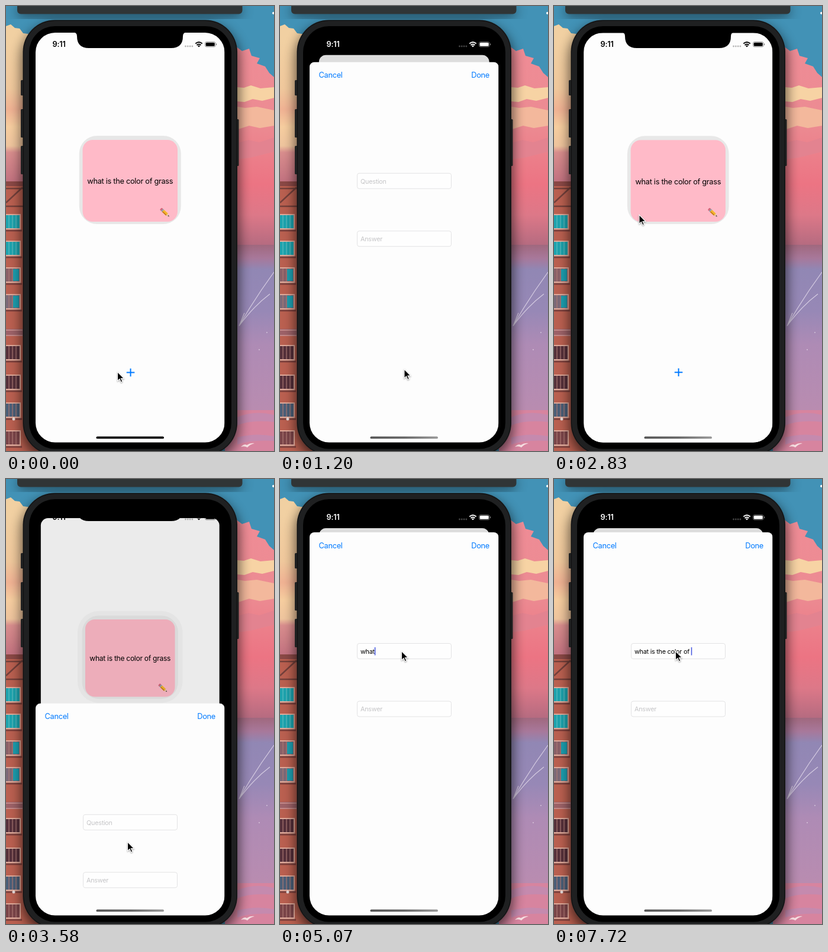
These frames come from a looping animation (453x751 px, 8000 ms). An HTML page:

```html
<!DOCTYPE html>
<html lang="en">
<head>
<meta charset="utf-8">
<title>Flash cards</title>
<style>
html, body { margin: 0; width: 100%; height: 100%; overflow: hidden; background: #000; }
svg { display: block; width: 453px; height: 751px; }
text { font-family: Inter, Roboto, sans-serif; white-space: pre; }
.big { font-size: 12.8px; letter-spacing: -.3px; }
.small { font-size: 10.8px; letter-spacing: -.24px; }
.hint { fill: #c5c5c7; }
.blue { fill: #007aff; }
</style>
</head>
<body>
<svg viewBox="0 0 453 751" xmlns="http://www.w3.org/2000/svg">
  <defs>
    <linearGradient id="left" x2="0" y2="1">
      <stop offset=".04" stop-color="#f1d0a2"/><stop offset=".15" stop-color="#f0c89c"/>
      <stop offset=".2" stop-color="#f0b293"/><stop offset=".24" stop-color="#f6cd9f"/>
      <stop offset=".285" stop-color="#eec49d"/><stop offset=".3" stop-color="#d88d8d"/>
      <stop offset=".4" stop-color="#b8667a"/>
    </linearGradient>
    <linearGradient id="cloud" x2="0" y2="1">
      <stop offset="0" stop-color="#ef8c96"/><stop offset=".4" stop-color="#ec8b92"/>
      <stop offset=".7" stop-color="#ec7483"/><stop offset=".85" stop-color="#dd7888"/>
      <stop offset="1" stop-color="#b56b80"/>
    </linearGradient>
    <linearGradient id="water" x2="0" y2="1">
      <stop offset="0" stop-color="#a0687e"/><stop offset=".08" stop-color="#a8789a"/>
      <stop offset=".15" stop-color="#9187b4"/><stop offset=".4" stop-color="#9788b6"/>
      <stop offset=".6" stop-color="#ae8bb5"/><stop offset="1" stop-color="#b98cb0"/>
    </linearGradient>
    <linearGradient id="bar">
      <stop offset="0" stop-color="#555"/><stop offset=".5" stop-color="#666"/><stop offset="1" stop-color="#999"/>
    </linearGradient>
    <filter id="soft" x="-20%" y="-20%" width="140%" height="140%"><feGaussianBlur stdDeviation="10"/></filter>
    <clipPath id="screen"><rect x="50" y="45" width="319.5" height="691.5" rx="33"/></clipPath>
  </defs>

  <!-- wallpaper -->
  <rect width="453" height="751" fill="#4292b6"/>
  <path d="M0 34l8-3 7 6 8 1 6 8 31 4V751H0z" fill="url(#left)"/>
  <path d="M370 60L391 70 399 76 411 72 415 84 429 88 424 97 438 102 445 113 453 120V404H370z" fill="url(#cloud)"/>
  <path d="M380 136l22 2 12-4 16 5 23-2v18l-20 5-16-3-14 5-23-2z" fill="#f7d3a4"/>
  <path d="M380 168l24 4 20-2 29 6v26l-24 4-18-4-31 10z" fill="#f3b89c"/>
  <path d="M380 234l30-8 18 4 25-8v24l-40 10-33 4z" fill="#e38390"/>
  <rect x="370" y="403" width="83" height="280" fill="url(#water)"/>
  <rect x="370" y="682" width="83" height="69" fill="#d7849f"/>
  <path d="M391 694q28-12 62-4v12q-40-4-62 6zM391 728q30-8 62-2v8q-40-2-62 6z" fill="#c58aae"/>
  <path d="M394 540Q420 494 453 449M394 540Q418 507 446 486M394 540l9-22" fill="none" stroke="#d6cce2" stroke-width="1.2"/>
  <path d="M397 744q6-6 10-3 6-4 13-3-8 2-12 7-4-3-11-1z" fill="#f6dfe2"/>
  <g fill="#fff"><circle cx="452" cy="12" r="2"/><circle cx="428" cy="580" r=".7"/><circle cx="441" cy="551" r=".7"/></g>

  <!-- building -->
  <rect y="296" width="60" height="455" fill="#ba6050"/>
  <path d="M0 296h30v8H0z" fill="#8a4845"/>
  <path d="M0 308h30M0 332L28 306M0 338h30" fill="none" stroke="#74403b" stroke-width="2.5"/>
  <path d="M0 545h30v12H0z" fill="#9d6268"/>
  <path d="M0 547h28M0 556h28" stroke="#cf9694" stroke-width="1.4"/>
  <g id="windows"></g>
  <circle cx="13" cy="697" r="2.5" fill="#fff" opacity=".8"/>

  <!-- toolbar and phone -->
  <rect x="19" y="0" width="380" height="18" rx="8" opacity=".5" filter="url(#soft)"/>
  <rect x="26" y="30" width="368" height="740" rx="58" opacity=".6" filter="url(#soft)"/>
  <rect x="19" y="-12" width="380.500" height="25.500" rx="6" fill="#303536"/>
  <g fill="#1f2021">
    <rect x="25" y="125" width="6" height="26" rx="1.500"/><rect x="25" y="174" width="6" height="48" rx="1.500"/>
    <rect x="25" y="236" width="6" height="48" rx="1.500"/><rect x="388" y="191" width="5.500" height="79" rx="1.500"/>
    <rect x="28.500" y="23.500" width="362.500" height="734.500" rx="54"/>
  </g>
  <rect x="29.500" y="24.500" width="360.500" height="732.500" rx="53" fill="none" stroke="#0e0e0f"/>
  <rect x="39" y="34" width="342" height="713.500" rx="44"/>

  <g clip-path="url(#screen)">
    <g id="home">
      <rect x="-159.750" width="319.500" height="700" rx="13" fill="#fdfdfd"/>
      <rect id="halo" x="-94" y="166" width="188" height="164" rx="38"/>
      <rect id="shade" x="-86" y="174" width="172" height="149" rx="30"/>
      <rect x="-80.250" y="181" width="160.500" height="138" rx="17" fill="#ffbac8"/>
      <text class="big" y="255.400" text-anchor="middle">what is the color of grass</text>
      <g transform="translate(51.700 297) rotate(43)">
        <rect y="-2.500" width="4" height="5" rx="1.500" fill="#d5687d"/>
        <rect x="3" y="-2.500" width="2.500" height="5" fill="#8fa3ad"/>
        <rect x="5.500" y="-2.500" width="9" height="5" fill="#f4b62b"/>
        <rect x="5.500" y=".8" width="9" height="1.700" fill="#c47a1c"/>
        <path d="M14.500-2.500L19.500 0 14.500 2.500z" fill="#e9c49a"/>
        <path d="M17.300-1.100L19.800 0 17.300 1.100z" fill="#333"/>
      </g>
      <path d="M-6 573.500H7.600M.8 566.700v13.600" stroke="#007aff" stroke-width="2"/>
      <rect id="dim" x="-159.750" width="319.500" height="700" rx="13"/>
    </g>
    <g id="sheet">
      <rect x="50" width="319.500" height="700" rx="8" fill="#fdfdfd"/>
      <text id="cancel" class="big blue" x="65.500" y="26.500">Cancel</text>
      <text class="big blue" x="354" y="26.500" text-anchor="end">Done</text>
      <g fill="#fefefe" stroke="#e3e3e4">
        <rect x="130.500" y="187.500" width="159" height="26" rx="3.500"/>
        <rect x="130.500" y="285" width="159" height="26" rx="3.500"/>
      </g>
      <text id="question" class="small" x="136" y="204.800"></text>
      <text class="small hint" x="136" y="302">Answer</text>
      <rect id="caret" y="194" width="1.500" height="13.500" fill="#4356e0"/>
    </g>
  </g>
  <path d="M112 44q8 0 8 7 0 20 20 20h139q20 0 20-20 0-7 8-7z"/>
  <g id="status">
    <text x="78.500" y="69.300" font-size="12.700" font-weight="600" letter-spacing="-.2">9:11</text>
    <g opacity=".27"><circle cx="303.500" cy="68" r="1.400"/><circle cx="307.300" cy="68" r="1.400"/><circle cx="311.100" cy="68" r="1.400"/><circle cx="314.900" cy="68" r="1.400"/></g>
    <path d="M320.300 63.500q5.700-5 11.400 0M322.500 66q3.500-3 7 0" fill="none" stroke="currentColor" stroke-width="1.900"/>
    <path d="M323.800 67.200q2.200-1.600 4.400 0L326 69.600z"/>
    <rect x="336.500" y="60.500" width="17.500" height="8.500" rx="2.500" fill="none" stroke="currentColor" stroke-opacity=".4"/>
    <rect x="337.700" y="61.700" width="15" height="6.100" rx="1.500"/>
    <rect x="355" y="63.200" width="1.200" height="3" rx=".6" opacity=".5"/>
  </g>
  <rect id="indicator" x="152.500" y="726.500" width="114.500" height="3.800" rx="1.900"/>
  <path id="mouse" d="M0 0V15.200L3.500 12 6 17.400 8.400 16.300 6 11.100H10.900z" stroke="#fff" stroke-width="1.100" style="filter:drop-shadow(0 1px 1px #0006)"/>
</svg>
<script>
const $ = id => document.getElementById(id);
const LOOP = 8000;

// building windows: top edge and glass colour
const panes = [[351, '#1da3ae'], [396, '#1da3ae'], [441, '#8a6068'], [486, '#7c6a78'],
               [572, '#55303a'], [622, '#55303a'], [669, '#4b5f78'], [716, '#7a4448']];
$('windows').innerHTML = panes.map(([y, c], i) => `
  <rect y="${y}" width="25" height="27" fill="#e0aa9b"/>
  <rect y="${y + 2}" width="23" height="22" fill="${c}"/>
  <path d="M5 ${y + 2}v22M11 ${y + 2}v22M17 ${y + 2}v22" stroke="${i < 2 ? '#62bcc0' : '#ad7a75'}" stroke-width="1.2"/>
  ${i > 1 && i < 4 ? `<path d="M12 ${y + 3}h10v20h-10z" fill="#1c9fb0"/>` : ''}
  <path d="M0 ${y + 28}h27" stroke="#7d403c" stroke-width="3"/>`).join('');

// screen refreshes: start, end, count
const ticks = [0];
for (const [a, b, n] of [[150, 450, 3], [900, 1800, 7], [1950, 2980, 8], [3130, 4170, 8],
                         [4470, 5070, 3], [5370, 6250, 7], [6700, 7720, 8]])
  for (let i = 0; i < n; i++) ticks.push(Math.round((a + (b - a) * i / (n - 1)) / 10) * 10);

const path = [[0, 188.5, 617.5], [450, 210, 613], [1200, 210, 613], [2100, 86.5, 109.5], [2400, 86.5, 109.5],
              [3280, 205.5, 612.5], [3580, 205.5, 612.5], [4020, 206.5, 286], [4170, 205.5, 290.5], [LOOP, 205.5, 290.5]];

const typed = [[4770, 2], [5070, 4], [5370, 6], [5520, 7], [5660, 8], [5810, 9], [5960, 10], [6100, 11], [6250, 12],
               [6700, 13], [6850, 14], [6990, 15], [7140, 16], [7280, 17], [7430, 18], [7570, 20], [7720, 21]];

const spring = ms => {
  const x = Math.max(0, ms) * .016;
  const v = 1 - (1 + x) * Math.exp(-x);
  return v > .994 ? 1 : v;
};
const clamp = v => Math.min(1, Math.max(0, v));

function pointer(t) {
  const i = Math.max(1, path.findIndex(k => k[0] >= t));
  const [a, x, y] = path[i - 1], [b, u, v] = path[i];
  const k = (t - a) / (b - a), e = k * k * (3 - 2 * k);
  return [x + (u - x) * e, y + (v - y) * e];
}

function draw(now) {
  const time = now % LOOP;
  const t = ticks.filter(k => k <= time).pop();
  const p = t < 2430 ? spring(t - 763) : t < 3464 ? 1 - spring(t - 2430) : spring(t - 3464);
  const glow = clamp(2 * p);

  $('home').setAttribute('transform', `translate(209.75 ${45 + 38 * p}) scale(${1 - .1 * p})`);
  $('dim').setAttribute('opacity', .125 * p);
  $('halo').setAttribute('opacity', .03 * glow);
  $('shade').setAttribute('opacity', .085 - .045 * glow);
  $('sheet').setAttribute('transform', `translate(0 ${737 - 647 * p})`);
  $('cancel').setAttribute('opacity', t > 2200 && t < 2390 ? .2 : 1);

  const g = Math.round(255 * clamp((p - .55) / .4));
  $('status').style.color = $('status').style.fill = `rgb(${g},${g},${g})`;
  $('indicator').setAttribute('fill', t < 900 ? '#000' : 'url(#bar)');

  const count = typed.reduce((n, [at, len]) => t >= at ? len : n, 0);
  const field = $('question');
  const words = 'what is the color of '.slice(0, count) || 'Question';
  if (field.textContent !== words) field.textContent = words;
  field.setAttribute('class', count ? 'small' : 'small hint');
  $('caret').style.display = t >= 4470 ? '' : 'none';
  $('caret').setAttribute('x', 136 + (count ? field.getComputedTextLength() : 0));

  $('mouse').setAttribute('transform', `translate(${pointer(t)})`);
}

const start = performance.now();
function loop() {
  draw(performance.now() - start);
  requestAnimationFrame(loop);
}
loop();
</script>
</body>
</html>
```
